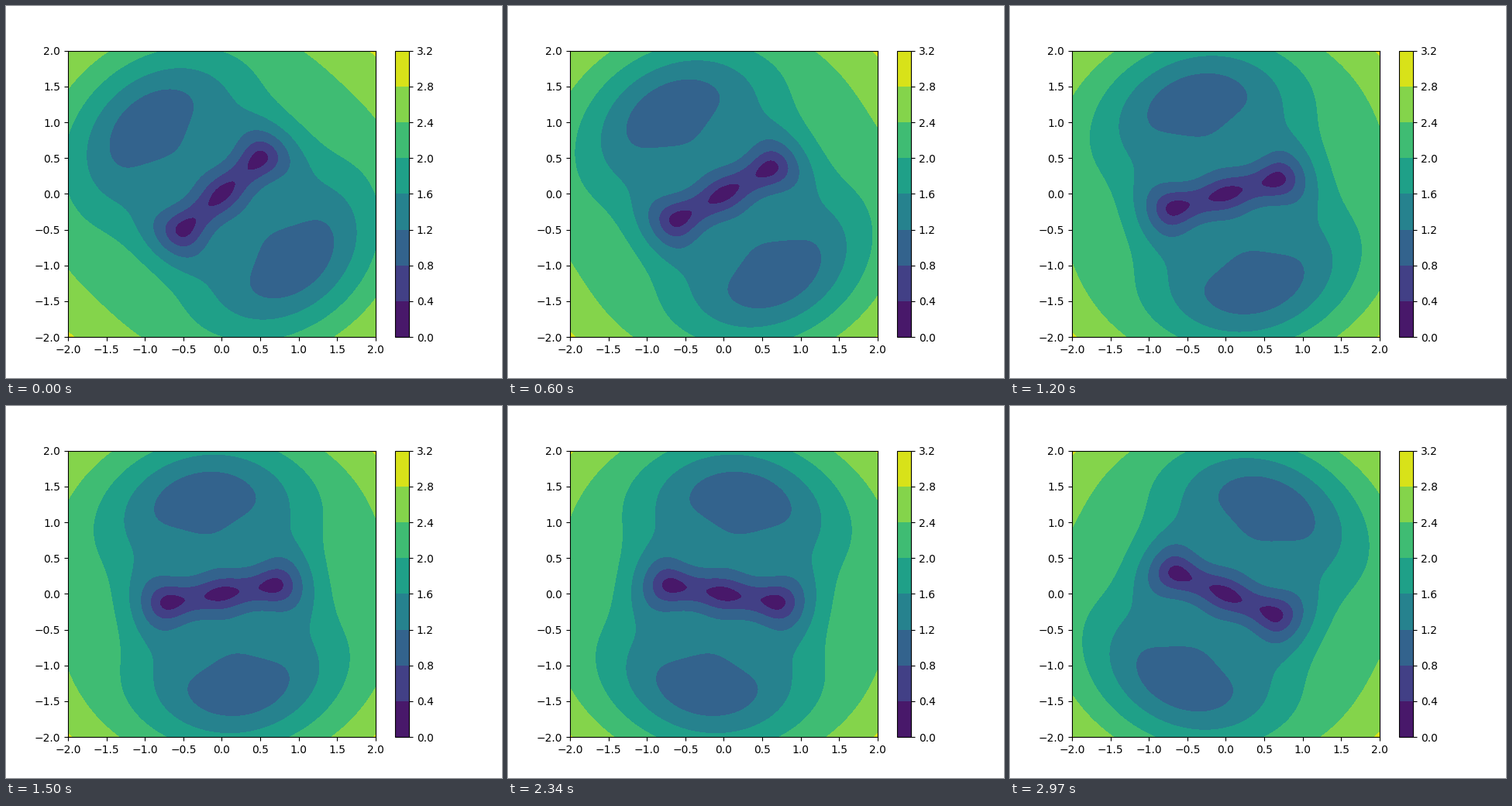
Recreate the animation shown at these times as a matplotlib script. Size 640x480 px, loop 3 s.

```python
import numpy as np
import matplotlib.pyplot as plt
from matplotlib.animation import FuncAnimation

FRAMES = 100
INTERVAL = 30
LEVELS = np.linspace(0, 3.2, 9)

axis = np.linspace(-2, 2, 201)
X, Y = np.meshgrid(axis, axis)
G = 3 * np.exp(-X**2 - Y**2)


def force(i):
    """Gradient size of a round bowl plus a turning, damped quadrupole."""
    angle = np.pi / 4 - np.pi * i / 256
    c, s = np.cos(angle), np.sin(angle)
    u, v = c * X + s * Y, c * Y - s * X
    q = u**2 - v**2
    return np.hypot(u * (1 - G * (1 - q)), v * (1 + G * (1 + q)))


fig, ax = plt.subplots(figsize=(6.4, 4.8), dpi=100)


def fill(i):
    return ax.contourf(X, Y, force(i), levels=LEVELS, cmap="viridis")


contours = fill(0)
fig.colorbar(contours, ax=ax)


def update(i):
    global contours
    contours.remove()
    contours = fill(i)
    return [contours]


anim = FuncAnimation(fig, update, frames=FRAMES, interval=INTERVAL,
                     init_func=lambda: [], repeat=True, repeat_delay=0)
plt.show()
```
